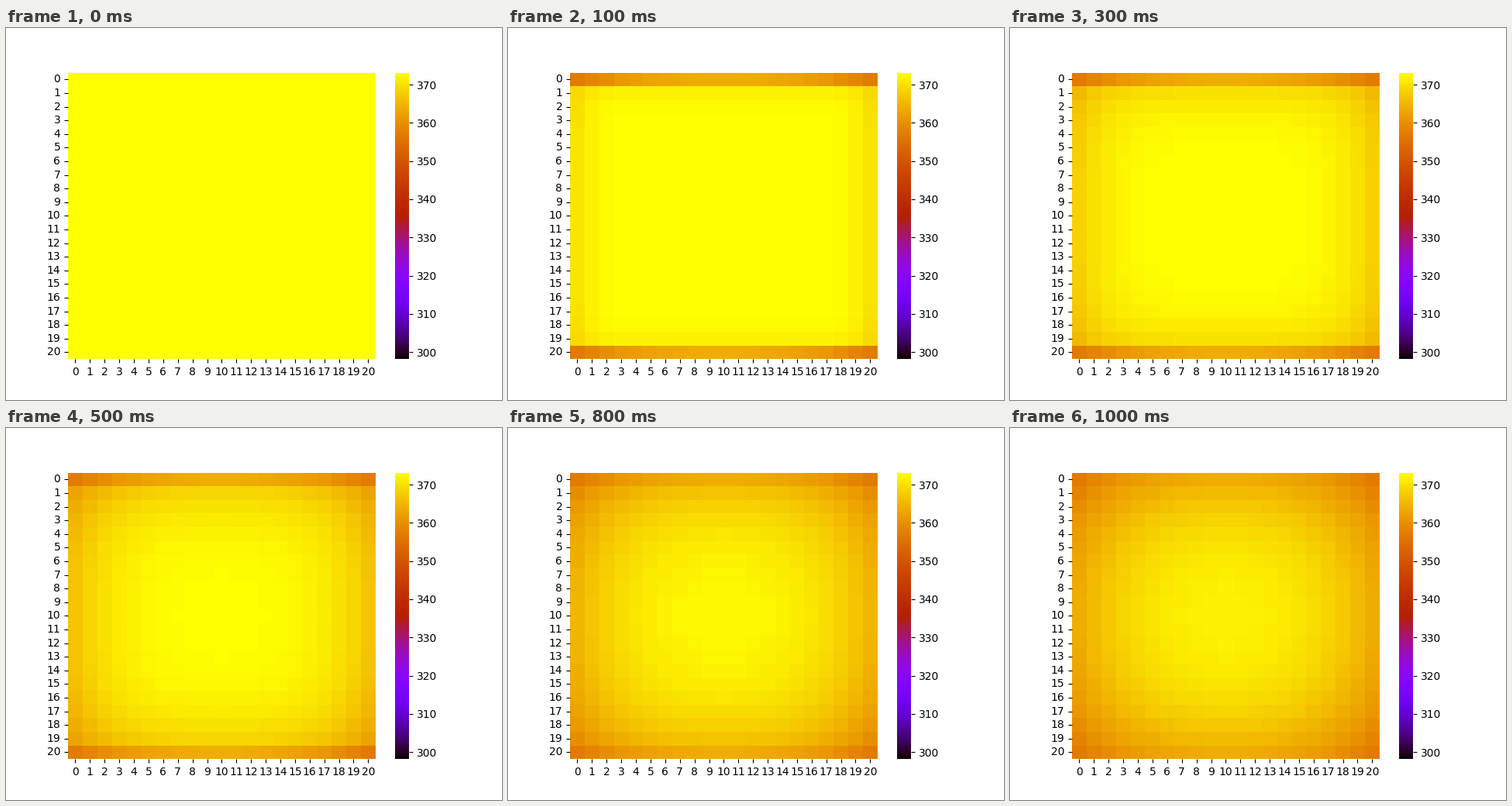
Animation of 640x480 px, one loop 1.1 s. Source, as a matplotlib script:

```python
import numpy as np
import matplotlib.pyplot as plt
from matplotlib.animation import FuncAnimation

N = 21                      # nodes per side
HOT, COLD = 373.15, 298.15  # plate and ambient temperature, K
DIFF = 1.5                  # diffusivity, cells^2 per time unit
BIOT = 0.0292               # surface heat loss per cell
SUB = 20                    # solver steps per time unit
TIMES = [0, 1, 2, 3, 3, 5, 5, 7, 8, 9, 10]


def cool_slab(t):
    """Relative temperature across a slab cooled by convection on both faces."""
    u = np.ones(N)
    k = DIFF / SUB
    for _ in range(t * SUB):
        left = u[1] - 2 * BIOT * u[0]
        right = u[-2] - 2 * BIOT * u[-1]
        p = np.concatenate([[left], u, [right]])
        u = u + k * (p[2:] - 2 * u + p[:-2])
    return u


def plate(t):
    """The square plate is the product of two slabs."""
    u = cool_slab(t)
    return COLD + (HOT - COLD) * np.outer(u, u)


END = plate(TIMES[-1])


def field(i):
    temp = plate(TIMES[i])
    if i > 0:
        # top and bottom edges jump straight to their end state
        temp[[0, -1]] = END[[0, -1]]
    return temp


fig, ax = plt.subplots(figsize=(6.4, 4.8), dpi=100)
mesh = ax.pcolormesh(field(0), cmap="gnuplot", vmin=COLD, vmax=HOT)
ax.set(xlim=(0, N), ylim=(N, 0))
ax.spines[:].set_visible(False)
ticks = np.arange(N) + 0.5
ax.set_xticks(ticks, range(N))
ax.set_yticks(ticks, range(N), va="center")

bar = fig.colorbar(mesh, ax=ax)
bar.outline.set_linewidth(0)


def draw(i):
    mesh.set_array(field(i))
    return [mesh]


anim = FuncAnimation(fig, draw, frames=len(TIMES), interval=100,
                     repeat=True, repeat_delay=0, blit=False)
plt.show()
```
